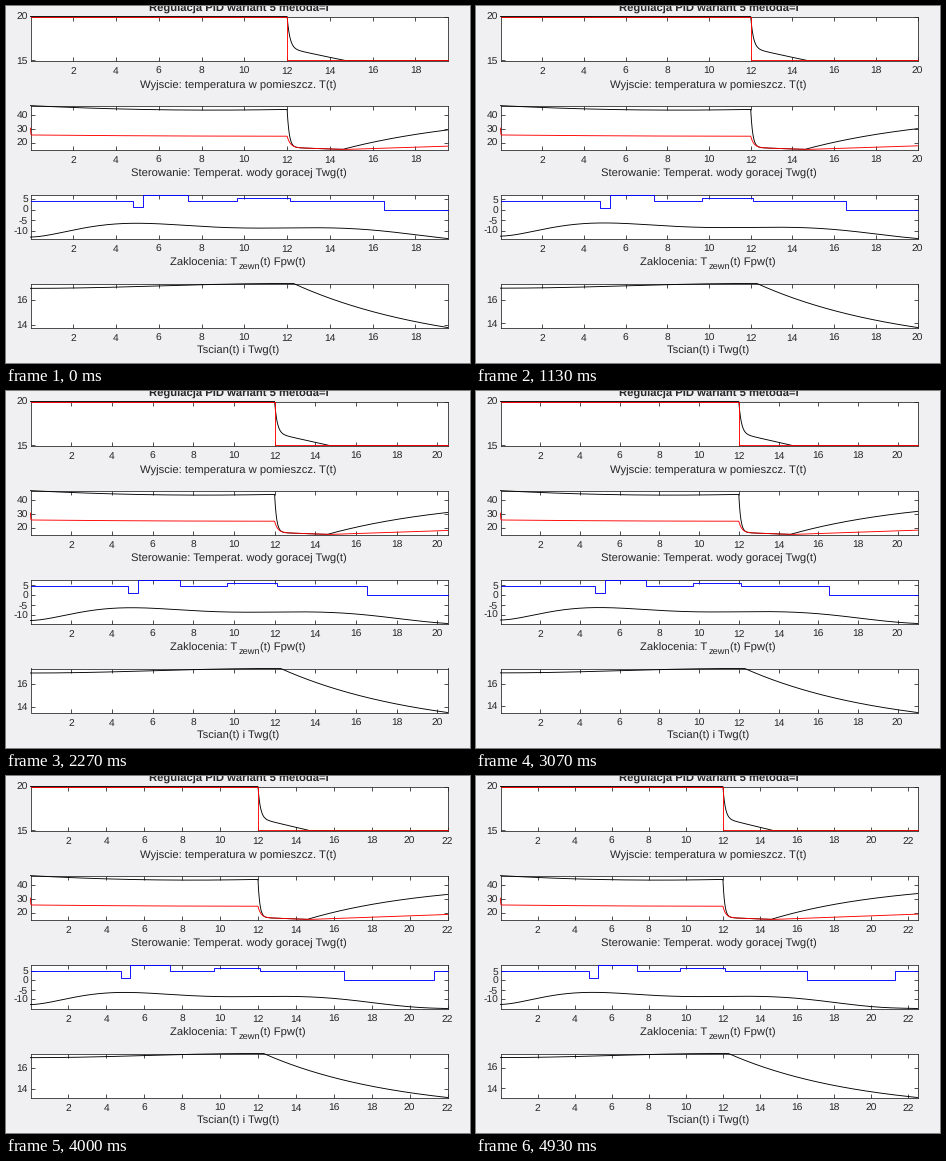
A matplotlib script for the animation above (4.99 s loop, 464x357 px).

```python
import numpy as np
import matplotlib.pyplot as plt
from matplotlib.animation import FuncAnimation

W, H, DPI = 464, 357, 64
PX = 72 / DPI                      # points per pixel
LOOP, FRAMES = 4990, 75
LEFT, RIGHT, TOP, HEIGHT, PITCH = 24.5, 441.5, 10.5, 44, 89
STARTS = [10, 23, 35, 47, 60, 73]  # frames at which half a time unit is added
INK = "#262626"
STEP = 12                          # moment the set point drops

plt.rcParams.update({"font.family": "Liberation Sans", "text.hinting": "none",
                     "axes.unicode_minus": False})

t = np.linspace(0, 22.5, 4501)
late = np.maximum(t - STEP, 0)


def decay(tau):
    return np.exp(-late / tau)


def rise(start, gain, tau):
    return gain * (1 - np.exp(-(t - start) / tau))


def after_step(before, after):
    return np.where(t < STEP, before, after)


room = after_step(20, np.maximum(15 + 1.35 * (1 - late / 2.6) + 3.65 * decay(0.13), 14.95))
falling = 16.4 - 0.55 * late
water = after_step(43.9 + 3.3 * (1 - t / 8.5) ** 2,
                   np.maximum(falling + 28 * decay(0.1), 15 + rise(14.6, 27, 6.5)))
coil = after_step(24.7 + 0.9 * (1 - t / STEP) ** 2 + 5 * np.exp(-t / 0.01),
                  np.maximum(falling + 8.3 * decay(0.15), 15 + 0.5 * (t - 14.8)))
wall = np.where(t < 12.3, 17.2 - 0.2 * np.cos(np.pi * t / STEP), 17.4 - rise(12.3, 5.65, 7))

knots = np.linspace(0, 22.5, 10)
outside = np.polynomial.Polynomial.fit(
    knots, [-12.7, -8.5, -6.4, -7.4, -8.55, -8.5, -8.7, -11.1, -13.8, -14.85], 7)(t)

flow_times = np.array([0, 4.78, 5.27, 7.35, 9.67, 12.13, 16.55, 21.3])
flow_parts = np.array([0.585, 0.145, 1, 0.585, 0.785, 0.585, 0, 0.61])

fig = plt.figure(figsize=(W / DPI, H / DPI), dpi=DPI, facecolor="#f0eff1")


def label(x, y, s, size=11.25, **kw):
    fig.text(x / W, 1 - y / H, s, size=size * PX, color=INK, va="baseline", **kw)


def panel(row, ylim, yticks):
    bottom = TOP + row * PITCH + HEIGHT
    ax = fig.add_axes([LEFT / W, 1 - bottom / H, (RIGHT - LEFT) / W, HEIGHT / H],
                      facecolor="white", ylim=ylim)
    ax.set_yticks(yticks)
    ax.tick_params(direction="in", top=True, right=True, length=4 * PX,
                   width=0.8 * PX, color=INK, labelcolor=INK, labelsize=10.2 * PX)
    ax.tick_params(axis="x", pad=5.8 * PX)
    ax.tick_params(axis="y", pad=2.5 * PX)
    for spine in ax.spines.values():
        spine.set(color=INK, linewidth=0.8 * PX)
    return ax


def curve(ax, color, **kw):
    return ax.plot([], [], color=color, lw=0.9 * PX, clip_on=False, zorder=3, **kw)[0]


def draw_steps(line, times, levels, end):
    """Stepped line that holds its last level up to the end."""
    seen = times < end
    line.set_data(np.append(times[seen], end),
                  np.append(levels[seen], levels[seen][-1]))


axes = [panel(0, (14.95, 20), [15, 20]),
        panel(1, (14.9, 47.3), [20, 30, 40]),
        panel(2, (-13.4, 7), [-10, -5, 0, 5]),
        panel(3, (13.7, 17.4), [14, 16])]
lines = [(curve(axes[row], color), data) for row, color, data in (
    (0, "black", room), (1, "black", water), (1, "red", coil),
    (2, "black", outside), (3, "black", wall))]
set_line = curve(axes[0], "red", drawstyle="steps-post")
flow_line = curve(axes[2], "blue", drawstyle="steps-post")

label(233, 5.8, "Regulacja PID wariant 5 metoda=I", weight="bold", ha="center")
label(232.5, 82.3, "Wyjscie: temperatura w pomieszcz. T(t)", ha="center")
label(232.5, 171, "Sterowanie: Temperat. wody goracej Twg(t)", ha="center")
label(164.5, 259.8, "Zaklocenia: T")
label(232.3, 263, "zewn", size=9.2)
label(254.3, 259.8, "(t) Fpw(t)")
label(232.5, 348.2, "Tscian(t) i Twg(t)", ha="center")


def draw(frame):
    end = 19.5 + 0.5 * np.searchsorted(STARTS, frame, side="right")
    seen = t <= end + 1e-9
    for line, data in lines:
        line.set_data(t[seen], data[seen])

    low = outside[seen].min()
    peak = -0.97 * low - 6.05
    draw_steps(set_line, np.array([0, STEP]), np.array([20, 15]), end)
    draw_steps(flow_line, flow_times, peak * flow_parts, end)

    for ax in axes:
        ax.set_xlim(0, end)
        ax.set_xticks(np.arange(2, end + 0.01, 2))
    axes[2].set_ylim(low, peak)
    axes[3].set_ylim(wall[seen].min(), 17.4)
    return []


anim = FuncAnimation(fig, draw, frames=FRAMES, interval=LOOP / FRAMES,
                     init_func=lambda: draw(0), repeat=True, repeat_delay=0)
plt.show()
```
